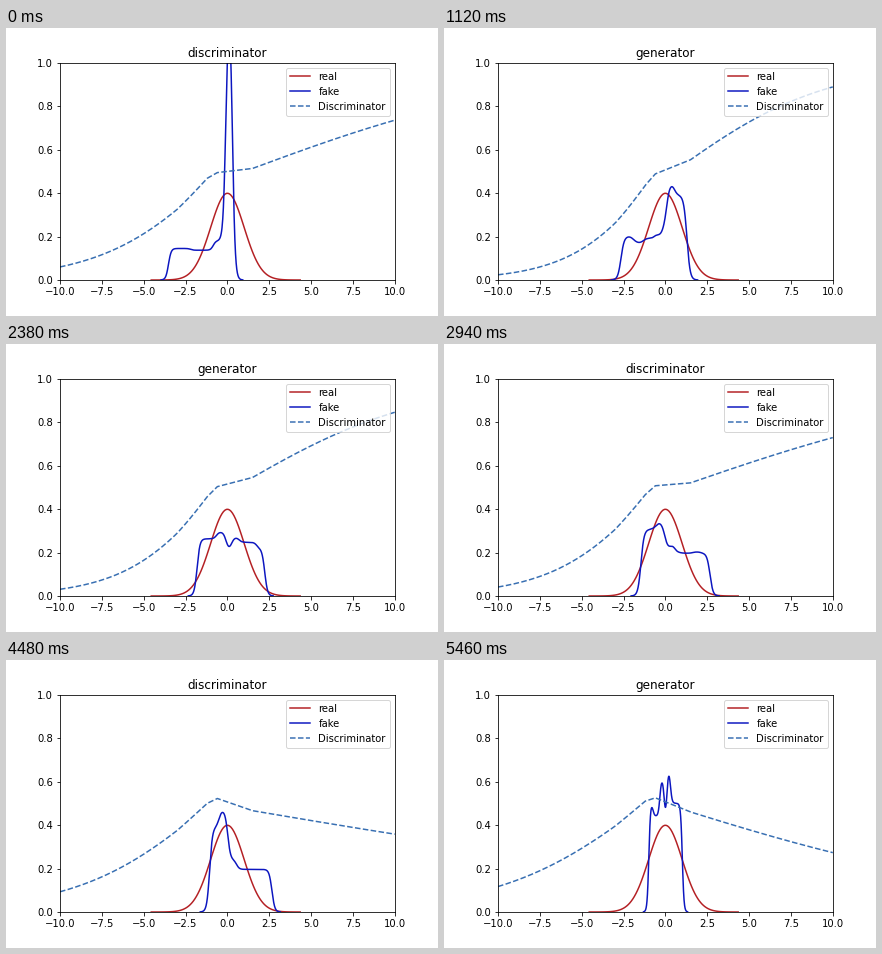
Animation, 432 px wide and 288 px high, one loop 5600 ms. Source, as a matplotlib script:

```python
import numpy as np
import matplotlib.pyplot as plt
from matplotlib.animation import FuncAnimation

FRAMES, STEP_MS = 40, 140
RED, BLUE, BLUE_GREY = "#b42024", "#0c16c0", "#386fb2"

plt.rcParams.update({"font.family": "DejaVu Sans", "font.size": 10})

XS = np.linspace(-10, 10, 401)
GRID = np.linspace(-5, 5, 4001)
LEVELS = 1 / (1 + np.exp(-np.linspace(-10, 10, 900)))


def edge(z):
    return .5 * (1 + np.tanh(z))


def logit(p):
    p = np.asarray(p)
    return np.log(p / (1 - p))


def blend(keys, n):
    """Neighbouring key states around step n and the share of the second."""
    steps = list(keys)
    k = max(i for i, s in enumerate(steps[:-1]) if s <= n)
    a, b = steps[k], steps[k + 1]
    return keys[a], keys[b], (n - a) / (b - a)


# Sigmoid of a piecewise linear function: its output at the hinges, per step
HINGES = [-10, -3, -1.2, -.6, 1.5, 10]
DISC = {
    0: (.060, .325, .468, .494, .513, .735),
    4: (.024, .262, .436, .488, .553, .888),
    7: (.023, .270, .445, .494, .550, .878),
    9: (.031, .289, .457, .503, .545, .845),
    14: (.063, .334, .480, .513, .483, .481),
    17: (.093, .375, .500, .522, .466, .358),
    19: (.117, .395, .510, .525, .460, .273),
}


def disc_curve(n):
    p, q, t = blend(DISC, n)
    line = np.interp(XS, HINGES, (1 - t) * logit(p) + t * logit(q))
    return 1 / (1 + np.exp(-line))


def density(width, *stairs):
    """Soft staircase of (start, height): quantiles, heights there, area."""
    y, last = 0, 0
    for start, height in stairs:
        y = y + (height - last) * edge((GRID - start) / width)
        last = height
    y = np.maximum(y, 1e-12)
    cdf = np.cumsum(y)
    area = cdf[-1] * (GRID[1] - GRID[0])
    x = np.interp(LEVELS, cdf / cdf[-1], GRID)
    return x, np.interp(x, GRID, y) / area, area


# Generated distribution per generator step
FAKE = {
    0: density(.16, (-3.52, .145), (-2.2, .137), (-.85, .18), (-.09, 1.35),
               (.3, 0)),
    5: density(.2, (-2.43, .225), (-1.77, .18), (-1.2, .215), (.12, .385),
               (.65, .335), (1.52, 0)),
    8: density(.17, (-1.81, .263), (-.65, .295), (-.08, .21), (.25, .27),
               (.7, .247), (1.75, .22), (2.23, 0)),
    11: density(.19, (-1.28, .335), (-.55, .37), (-.03, .225), (.6, .178),
                (1.8, .186), (2.88, 0)),
    15: density(.17, (-1.06, .39), (-.5, .47), (.02, .24), (.55, .196),
                (2.66, 0)),
    20: density(.1, (-.99, .51), (-.75, .44), (-.33, .62), (-.07, .4),
                (.09, .67), (.3, .5), (1.01, 0)),
}


def fake_curve(n):
    """Move each quantile straight from one state to the next."""
    (x0, y0, a0), (x1, y1, a1), t = blend(FAKE, n)
    y = 1 / ((1 - t) / y0 + t / y1)
    return (1 - t) * x0 + t * x1, y * ((1 - t) * a0 + t * a1)


fig = plt.figure(figsize=(6, 4), dpi=72, facecolor="white")
ax = fig.add_axes([.125, .125, .775, .755])
ax.set(xlim=(-10, 10), ylim=(0, 1))
title = ax.set_title("discriminator", fontsize=12)

xr = np.linspace(-4.55, 4.35, 100)
ax.plot(xr, np.exp(-xr ** 2 / 2) / np.sqrt(2 * np.pi), color=RED, lw=1.5, label="real")
fake, = ax.plot([], [], color=BLUE, lw=1.5, label="fake")
disc, = ax.plot([], [], "--", color=BLUE_GREY, lw=1.5, label="Discriminator")
ax.legend(loc="upper right")


def draw(i):
    # Five discriminator steps, then five generator steps
    cycle, j = divmod(i, 10)
    title.set_text("discriminator" if j < 5 else "generator")
    disc.set_data(XS, disc_curve(5 * cycle + min(j, 4)))
    fake.set_data(*fake_curve(5 * cycle + max(j - 4, 0)))
    return title, disc, fake


anim = FuncAnimation(fig, draw, frames=FRAMES, interval=STEP_MS, repeat=True)
plt.show()
```
